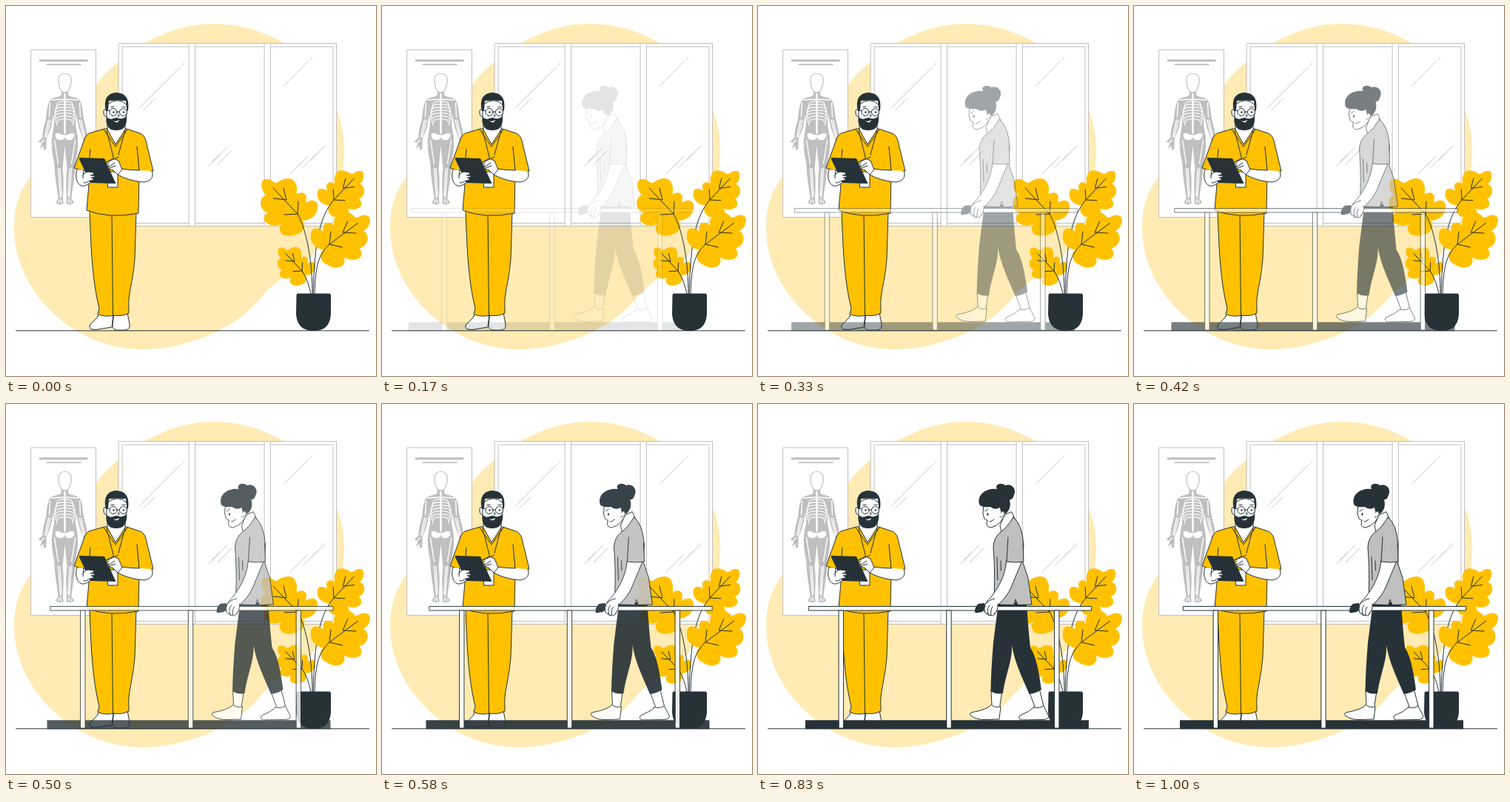
An HTML page that plays this animation: 500 by 500 pixels, repeating every 1.04 s.

```html
<!DOCTYPE html>
<html lang="en">
<head>
<meta charset="utf-8">
<title>Rehabilitation room</title>
<style>
  html, body { margin: 0; width: 100%; height: 100%; overflow: hidden; background: #fff; }
  svg { display: block; width: 100vw; height: 100vh; }
  g, path { stroke-linecap: round; stroke-linejoin: round; }
  .ink { fill: none; stroke: #263238; }
  .skin { fill: #fff; stroke: #263238; }
  .scrubs { fill: #ffc100; stroke: #263238; }
  .shirt { fill: #bfbfbf; stroke: #263238; }
  .dark { fill: #263238; }
  .frame { fill: #fff; stroke: #bfbfbf; }
  .shine { fill: none; stroke: #c4c4c4; stroke-width: .9; }
  .grey { fill: #bfbfbf; }
  .bone { fill: none; stroke: #fff; stroke-width: 1.4; }
</style>
</head>
<body>
<svg viewBox="0 0 500 500">
  <defs>
    <!-- one leaf, its stalk joint at the origin -->
    <path id="blade" fill="#ffc100" d="M-42-26C-50-30-52-48-42-47C-35-48-34-42-28-42C-18-50-6-50-3-42C1-34-2-28-1-26C2-30 11-30 12-23Q12-18 11-15C18-20 28-20 27-9C27 2 17 9 6 9C13 12 8 26 0 27C-10 32-22 30-24 22Q-25 17-22 14C-32 18-46 14-45 6C-45 1-42 0-41-2C-52-6-53-22-42-26Z"/>
    <path id="veins" class="ink" vector-effect="non-scaling-stroke" d="M0 0L-33-35M-19-35L-15-19L-33-21M1-17L0 0L-18 1"/>
    <g id="leaf"><use href="#blade"/><use href="#veins"/></g>

    <!-- left half of the poster figure, mirrored for the right -->
    <g id="half">
      <path class="grey" d="M.3 115H-4.500L-5 121C-11 124-18 123-21 129C-25 138-24 146-26 155C-29 165-30 170-30 178L-36 183L-31 186L-34 193L-29 189V195L-25 193V180C-20 169-17 159-16 147C-14 155-14 162-16 169C-20 186-16 204-14 213C-14 232-10 246-9 260L-12.500 266Q-7 270-2 267L-2.500 259C-2 246-1 234-3 220L.3 187Z"/>
      <path class="bone" d="M-1 126L-18 127M-20 131L-21 150M-22 154L-27 177M-19.500 154L-25 177M-28 181L-32 185M-14 181L-9 213M-9 219L-6 259M-6.500 220L-4.500 257M-7 262L-9 266M-5 262V266"/>
      <path fill="#fff" d="M0 178L-3 181Q-13 183-13 173Q-9 170-4 174L0 174Z"/>
      <path id="ribs" class="bone" style="stroke-width:1.200"/>
    </g>
  </defs>

  <path fill="#ffebb3" d="M280 24C325 24 353 38 379 52C425 85 458 140 457 195C456 245 445 291 413 338C394 359 369 364 342 397C309 436 247 464 181 464C91 462 11 386 11 300C11 250 34 225 67 197C108 163 101 132 122 106C152 68 213 24 280 24Z"/>

  <!-- window -->
  <g class="frame">
    <path d="M152.500 50.500h294v247h-294zM157.500 55h284.500v238.500h-284.500z"/>
    <path id="mullion" d="M247.500 50.500h8v247h-8z"/>
    <use href="#mullion" x="102"/>
  </g>
  <path class="shine" d="M181 137l55-55m2.500-2.500l2.500-2.500M186 140.500l15.500-15M375.500 108l33.500-33.500m2-2l3-3M274 216l14.500-14.500m-9.500 8.500l20-19M285.500 214.500l19.500-19.500M384 227l24-24m-7 15.500l19.500-19.500m-9.500 10l21-21"/>

  <!-- anatomy poster -->
  <path class="frame" d="M34 59h87.500v226.500h-87.500z"/>
  <path class="grey" d="M45 72.300h65.500v3h-65.500zM54.500 78.200h47v1.800h-47z"/>
  <g transform="translate(79.500 0)">
    <use href="#half"/>
    <use href="#half" transform="scale(-1 1)"/>
    <path class="bone" stroke-dasharray="1.500 1.200" style="stroke-width:2.500" d="M0 119V172"/>
    <path fill="#fff" stroke="#bfbfbf" stroke-width="1.200" d="M-8.500 101C-10 88 10 88 8.500 101Q9 105 7.500 108Q6 116 0 117Q-6 116-7.500 108Q-9 105-8.500 101Z"/>
  </g>

  <path class="ink" d="M13.500 438.800h477"/>

  <!-- plant -->
  <use href="#leaf" transform="translate(400 358) scale(.67)"/>
  <use href="#leaf" transform="translate(394 281)"/>
  <use href="#leaf" transform="translate(443 262) scale(-.83 .83)"/>
  <path class="ink" d="M415 389C417 318 424 284 443 262"/>
  <use href="#leaf" transform="translate(437 322) rotate(10) scale(-1 1)"/>
  <path class="ink" d="M412 389Q408 369 400 358M414 389C414 347 407 304 394 281M417 389C418 346 424 335 437 322"/>
  <path class="dark" d="M394 388.500h43q2 0 2 2.500v25c-1 17-10 23-23 23s-23-6-24-23l.5-25q0-2.500 1.500-2.500z"/>

  <!-- therapist -->
  <g>
    <path class="skin" d="M125 416L124 420Q118 427 114 430Q111 435 116 437Q123 438 130 436L143 434L145 416ZM146 414L144 431Q144 437 149 438H161Q168 437 167 430L164 414Z"/>
    <path class="scrubs" d="M113 277C115 334 117 371 126 409L124 416Q133 421 145 418Q157 420 166 415V409C164 391 172 371 174 342L176 278Z"/>
    <path class="ink" d="M143 283L144.500 418"/>
    <path class="scrubs" d="M133 166L112 172Q108 174 106 180L92 219Q101 223 111 223L112 241L109 276Q139 288 179 280L180 223Q190 225 199 223L189 182Q187 174 181 172L163 166Z"/>
    <path class="ink" d="M114 194L111 223M180 223L177 190"/>
    <path class="skin" d="M137 159V167L148 187L161 167V157Z"/>
    <path class="ink" d="M132 167L148 190L164 167M136 168L147 212M161 168L152 201"/>
    <path class="skin" d="M96 221C93 230 95 240 102 243C109 244 113 239 119 234L117 225L108 224L104 230L105 222"/>
    <path class="skin" d="M197 223C200 230 197 237 186 238C174 237 162 234 151 228L156 220Q168 222 180 222"/>

    <path class="skin" d="M137 141Q131 137 132 145Q133 151 137 149"/>
    <path class="skin" d="M136 134V158Q149 171 162 157L164 134Q151 121 136 134Z"/>
    <path class="dark" d="M135 142C132 128 135 118 149 117C163 118 167 126 165 142L163 139L162 128Q150 127 139 128L138 141Z"/>
    <path class="dark" d="M136 150Q140 154 145 152Q149 150 153 152Q160 153 163 148C164 164 158 168 149 168C140 168 135 164 136 150Z"/>
    <path fill="#fff" d="M145 155Q149 157 153 154Q152 158 148 157Z"/>
    <g id="lens"><circle class="skin" cx="145" cy="143.500" r="5"/><circle class="dark" cx="145.500" cy="143.500" r="1.200"/></g>
    <use href="#lens" x="13.500"/>
    <path class="ink" d="M150 143h3.500M140 142l-4-1M142 136.500l4-.5M157 136l4 .5M152 146l1 3h-2"/>

    <path class="skin" d="M138 224h13v21h-13z"/>
    <path class="dark" d="M100 205L133 206L148.500 240L114 239L98.500 206Q98.500 205 100 205Z"/>
    <path class="skin" d="M104 233Q103 225 111 224L118 225Q120 228 114 229H119Q121 232 115 232L118 233Q119 236 113 236Q109 240 105 239"/>
    <path class="skin" d="M135 211L145 206L152 209L157 221L151 228L145 222L137 219L140 216L135 216L139 212"/>
    <path class="ink" d="M137 211l15-7M141 216l6-4M139 219l9-3"/>
  </g>

  <!-- patient and parallel bars -->
  <g id="patient">
    <path class="dark" d="M62 427.300h383v12h-383z"/>
    <path class="skin" d="M313 387L314 406Q308 413 286 417Q283 420 287 422Q294 427 306 426.500L324 426L326 410L325 407L328 388ZM364 387L372 409Q365 416 352 421Q349 425 354 427L383 426.500Q391 426 391 422L384 408L378 384Z"/>
    <path class="ink" d="M314 407Q319 411 325 409M371 410Q378 412 384 408"/>
    <path class="dark" d="M323 268L316 323Q313 360 312.500 388Q320 393 329 391C333 363 342 348 341 326C345 350 356 371 364.500 392Q374 391 381 386C378 365 375 343 366 329Q363 301 361 268Z"/>
    <path class="skin" d="M331 150L325 164L327 173L342 165L346 157L341 146Z"/>
    <path class="shirt" d="M343 153Q334 168 326 173Q317 180 316 193C318 220 318 239 317 263L325 271L344 271.500L346 264L349 271.500L368 271L363 235L356 214L357 190Q355 162 343 153Z"/>
    <path class="skin" d="M334 211C332 234 322 249 313 261Q305 268 304 275Q304 282 307 283L310 286L318 284Q323 277 322 272Q335 260 340 248L355 212Z"/>
    <path class="shirt" d="M336 180L334 213Q346 215 357 213L356 188"/>
    <path class="ink" d="M321 207l1 31M326 212l.5 13"/>
    <path class="skin" d="M303 135L302 148L304 155Q306 157 308 157L307 162Q308 167 313 167Q321 165 326 159L335 145L329 126Z"/>
    <path class="dark" d="M297 135C294 121 308 113 321 115C317 107 329 106 332 110C341 107 348 115 344 123Q342 130 338 129C341 141 336 148 327 149L325 140Q318 144 312 139Q304 140 300 138Q298 138 297 135Z"/>
    <path class="skin" d="M326 147Q330 142 331 148Q331 152 325 153" stroke-width=".8"/>
    <path class="ink" d="M305 145l4-3M311 159q3 0 6-3"/>
    <ellipse class="dark" cx="308.500" cy="149" rx="1.200" ry="1.700"/>
    <path class="skin" d="M66.700 273.500h382v5.500h-382z"/>
    <path id="post" class="skin" d="M107.500 279h6v159h-6z"/>
    <use href="#post" x="145.700"/>
    <use href="#post" x="291.500"/>
    <path class="dark" d="M304 269L296 270Q291 274 291 281Q292 283 295 282L301 281L306 276Z"/>
    <path class="skin" d="M318 263Q309 265 305 271Q303 277 305 282Q307 284 309 283Q310 287 313 285Q316 288 318 283Q323 278 322 270"/>
    <path class="ink" d="M309 283Q307 277 311 272M313 285Q312 278 315 274"/>
  </g>
</svg>
<script>
  const LOOP = 1040, FRAMES = 24, STEP = 1000 / FRAMES, SHIFT = 30;
  const patient = document.getElementById('patient');

  // Rib cage: widest in the middle
  let ribs = '';
  for (let i = 0; i < 7; i++) {
    const w = 10 + 3 * Math.sin(Math.PI * i / 6);
    ribs += `M-1 ${129 + 4 * i}c${-w} -1 ${-w} 5 ${-w} 8`;
  }
  document.getElementById('ribs').setAttribute('d', ribs);

  const bezier = (a, b, s) => 3 * (1 - s) ** 2 * s * a + 3 * (1 - s) * s * s * b + s ** 3;

  // cubic-bezier(.36, -.01, .5, 1.38)
  function ease(x) {
    let lo = 0, hi = 1;
    for (let i = 0; i < 24; i++) {
      const mid = (lo + hi) / 2;
      if (bezier(.36, .5, mid) < x) lo = mid; else hi = mid;
    }
    return bezier(-.01, 1.38, lo);
  }

  // Held at 24 pictures per second, each showing the middle of its step
  function draw(now) {
    const step = Math.min(FRAMES, Math.floor((now % LOOP + 5) / STEP));
    const p = step < 2 ? 0 : ease(Math.min(1, (step + .5) / FRAMES));
    patient.setAttribute('transform', `translate(${SHIFT * (p - 1)} 0)`);
    patient.setAttribute('opacity', Math.min(1, p));
  }

  let start;
  function tick(now) {
    start ??= now;
    draw(now - start);
    requestAnimationFrame(tick);
  }
  draw(0);
  requestAnimationFrame(tick);
</script>
</body>
</html>
```
